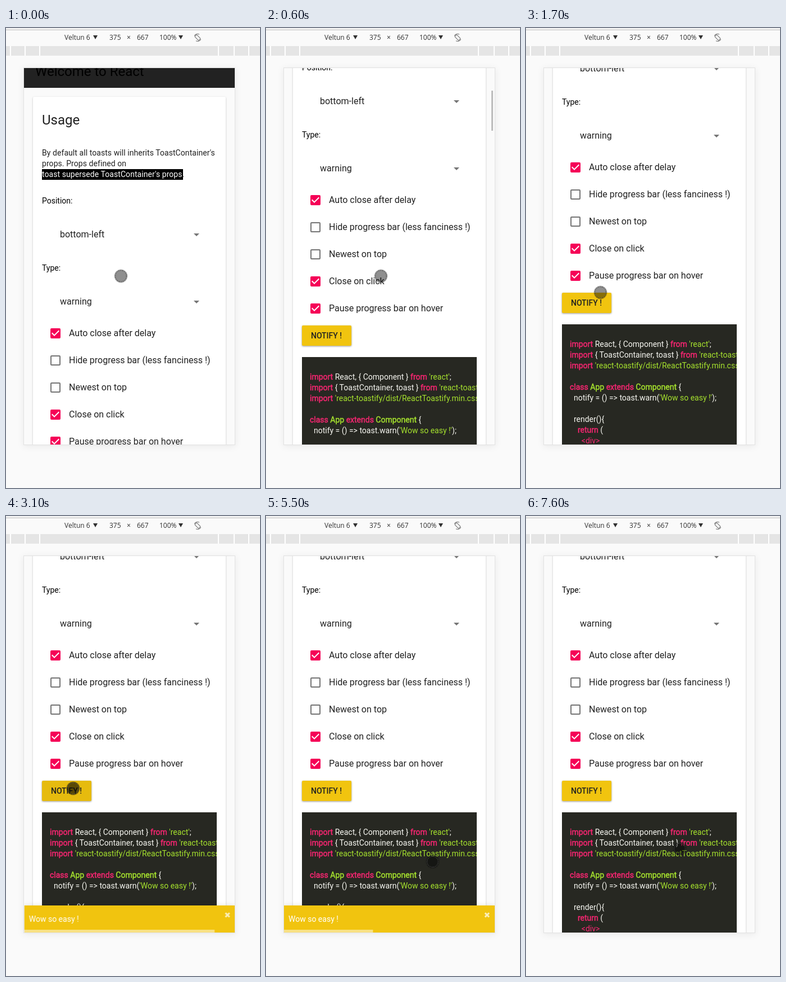
Recreate the animation shown at these times as an HTML page. Size 452 px wide and 815 px high, loop 8000 ms.

```html
<!DOCTYPE html>
<html lang="en">
<head>
<meta charset="utf-8">
<title>Toast demo</title>
<style>
html, body { margin: 0; width: 100%; height: 100%; overflow: hidden; background: #fafafa; }
svg { display: block; font-family: Roboto, sans-serif; }
text { white-space: pre; }
.toolbar { font: 12px "Open Sans", "Noto Sans", sans-serif; fill: #303030; }
.body { font-size: 14px; fill: #212121; letter-spacing: .065px; }
.label { font-size: 14px; }
.item { font-size: 16px; fill: #212121; }
.card { fill: #fff; filter: drop-shadow(0 1px 1.5px rgba(0,0,0,.24)); }
.button { fill: #f1c40f; filter: drop-shadow(0 1px 1.5px rgba(0,0,0,.4)); }
.code { font-size: 14px; fill: #f8f8f2; }
.key { fill: #f92672; stroke: #f92672; stroke-width: .45px; }
.name { fill: #a6e22e; stroke: #a6e22e; stroke-width: .45px; }
.str { fill: #a6e22e; }
.tag { fill: #f92672; }

.page, .thumb, .ripple, .toast, .progress, .cursor, .press {
  animation: 8s linear infinite paused;
}
.page { animation-name: scroll; }
.thumb { animation-name: thumb; }
.ripple { animation-name: ripple; }
.toast { animation-name: toast; }
.progress { animation-name: progress; }
.cursor { animation-name: cursor; }
.press { animation-name: press; }

@keyframes scroll {
  0%, 3.75% { transform: translateY(0); }
  7.5% { transform: translateY(-236px); animation-timing-function: ease-out; }
  10%, 100% { transform: translateY(-294px); }
}
@keyframes thumb {
  0%, 3.75% { transform: translateY(87px); opacity: 0; }
  5% { opacity: 1; }
  7.5% { transform: translateY(111px); animation-timing-function: ease-out; }
  10% { transform: translateY(117px); }
  16.25% { opacity: 1; }
  20%, 100% { transform: translateY(117px); opacity: 0; }
}
@keyframes ripple {
  0%, 31.24% { opacity: 0; }
  31.25% { opacity: .12; }
  38.75% { opacity: .04; }
  41.25%, 100% { opacity: 0; }
}
@keyframes toast {
  0% { transform: translateX(-3000px); opacity: 0; }
  32.69% { transform: translateX(-3000px); opacity: 0; animation-timing-function: cubic-bezier(.215,.61,.355,1); }
  38.31% { transform: translateX(25px); opacity: 1; animation-timing-function: cubic-bezier(.215,.61,.355,1); }
  39.72% { transform: translateX(-10px); animation-timing-function: cubic-bezier(.215,.61,.355,1); }
  41.13% { transform: translateX(5px); animation-timing-function: cubic-bezier(.215,.61,.355,1); }
  42.06% { transform: translateX(0); }
  86.63% { transform: translateX(0); animation-timing-function: ease; }
  88.5% { transform: translateX(20px); opacity: 1; animation-timing-function: ease; }
  96%, 100% { transform: translateX(-2000px); opacity: 0; }
}
@keyframes progress {
  0%, 32.69% { transform: scaleX(1); }
  85.88%, 100% { transform: scaleX(.149); }
}
@keyframes cursor {
  0%, 16.25% { transform: translate(204.5px, 439.5px); }
  21.25% { transform: translate(132.5px, 468.5px); }
  23.75%, 26.25% { transform: translate(117.5px, 482.5px); }
  27.5%, 41.25% { transform: translate(119.5px, 482.5px); animation-timing-function: ease-in-out; }
  52.5% { transform: translate(436px, 519px); animation-timing-function: ease-in; }
  63.75% { transform: translate(389px, 527px); }
  68.75% { transform: translate(296.5px, 612.5px); }
  75% { transform: translate(255px, 681px); animation-timing-function: ease-out; }
  82.5%, 87.5% { transform: translate(230.5px, 712.5px); animation-timing-function: ease-in-out; }
  95%, 100% { transform: translate(273.5px, 589.5px); }
}
@keyframes press {
  0%, 31.24% { opacity: 0; }
  31.25%, 41.25% { opacity: .3; }
  41.26%, 86.24% { opacity: 0; }
  86.25%, 88.74% { opacity: .3; }
  88.75%, 100% { opacity: 0; }
}
</style>
</head>
<body>
<svg width="452" height="815" viewBox="0 0 452 815">
  <defs>
    <clipPath id="screen"><rect x="32" y="71" width="375" height="667"/></clipPath>
    <clipPath id="codeBox"><rect x="64" y="819" width="311" height="400"/></clipPath>
    <g id="on">
      <rect x="3" y="3" width="18" height="18" rx="2" fill="#f50057"/>
      <path d="M5.7 11.3 10 15.6 18.3 7.3" fill="none" stroke="#fff" stroke-width="2"/>
    </g>
    <rect id="off" x="4" y="4" width="16" height="16" rx="1" fill="none" stroke="#757575" stroke-width="2"/>
    <path id="drop" d="M0 0h10l-5 5z" fill="#757575"/>
    <path id="caret" d="M0 0h8l-4 7z" fill="#303030"/>
  </defs>

  <rect width="452" height="815" fill="#fafafa"/>
  <rect width="452" height="3" fill="#f2f2f2"/>
  <rect y="3" width="452" height="1" fill="#c4c4c4"/>
  <rect y="4" width="452" height="28" fill="#fafafa"/>
  <rect y="32" width="452" height="17" fill="#e5e5e5"/>
  <path d="M8 32v17M34 32v17M60 32v17M378 32v17M406 32v17M432 32v17" stroke="#fff" stroke-width="2"/>
  <g class="toolbar">
    <text x="104" y="21">Veltun 6</text>
    <use href="#caret" x="155" y="13"/>
    <text x="184" y="21">375</text>
    <text x="215" y="21">×</text>
    <text x="233" y="21">667</text>
    <text x="273" y="21">100%</text>
    <use href="#caret" x="307" y="13"/>
  </g>
  <g transform="translate(341 17) rotate(-45)" fill="none" stroke="#6e6e6e">
    <rect x="-2.5" y="-5" width="5" height="10" rx="1"/>
    <path d="M-2-6.2A6.5 6.5 0 0 1 6.2-2M2 6.2A6.5 6.5 0 0 1-6.2 2"/>
  </g>

  <rect x="31.5" y="70.5" width="376" height="668" fill="#fafafa" stroke="#e2e2e2" style="filter:drop-shadow(0 2px 6px rgba(0,0,0,.07))"/>

  <g clip-path="url(#screen)">
    <g class="page">
      <rect x="32" y="0" width="375" height="106" fill="#222"/>
      <text x="52" y="85" font-size="24">Welcome to React</text>
      <rect class="card" x="48" y="122" width="343" height="1300" rx="2"/>
      <text x="64" y="171" font-size="24" fill="#212121">Usage</text>

      <rect x="64" y="250" width="251" height="19"/>
      <g class="body">
        <text x="64" y="226">By default all toasts will inherits ToastContainer's</text>
        <text x="64" y="245">props. Props defined on</text>
        <text x="64" y="264"><tspan fill="#fff">toast supersede ToastContainer's props</tspan>.</text>
      </g>

      <text class="label" x="64" y="311">Position:</text>
      <text class="item" x="96" y="371">bottom-left</text>
      <use href="#drop" x="334" y="364"/>
      <text class="label" x="64" y="430">Type:</text>
      <text class="item" x="96" y="490">warning</text>
      <use href="#drop" x="334" y="483"/>

      <use href="#on" x="76" y="529"/>
      <text class="item" x="112" y="546">Auto close after delay</text>
      <use href="#off" x="76" y="577"/>
      <text class="item" x="112" y="594">Hide progress bar (less fanciness !)</text>
      <use href="#off" x="76" y="625"/>
      <text class="item" x="112" y="642">Newest on top</text>
      <use href="#on" x="76" y="673"/>
      <text class="item" x="112" y="690">Close on click</text>
      <use href="#on" x="76" y="721"/>
      <text class="item" x="112" y="738">Pause progress bar on hover</text>

      <rect class="button" x="64" y="763" width="88" height="36" rx="2"/>
      <rect class="ripple" x="64" y="763" width="88" height="36" rx="2"/>
      <text x="80" y="786" font-size="14" font-weight="500" fill="#212121">NOTIFY !</text>

      <rect x="64" y="819" width="311" height="400" fill="#272822"/>
      <g class="code" clip-path="url(#codeBox)">
        <text x="78" y="859"><tspan class="key">import</tspan> React, { Component } <tspan class="key">from</tspan> <tspan class="str">'react'</tspan>;</text>
        <text x="78" y="878"><tspan class="key">import</tspan> { ToastContainer, toast } <tspan class="key">from</tspan> <tspan class="str">'react-toastify'</tspan>;</text>
        <text x="78" y="897"><tspan class="key">import</tspan> <tspan class="str">'react-toastify/dist/ReactToastify.min.css'</tspan>;</text>
        <text x="78" y="935"><tspan class="key">class</tspan> <tspan class="name">App</tspan> <tspan class="key">extends</tspan> <tspan class="name">Component</tspan> {</text>
        <text x="78" y="954">  notify = () =&gt; toast.warn(<tspan class="str">'Wow so easy !'</tspan>);</text>
        <text x="78" y="992">  render(){</text>
        <text x="78" y="1011">    <tspan class="key">return</tspan> (</text>
        <text x="78" y="1030">      <tspan class="tag">&lt;div&gt;</tspan></text>
      </g>
    </g>

    <rect class="thumb" x="401" width="3" height="71" fill="#bdbdbd"/>

    <g class="toast">
      <rect x="32" y="690" width="375" height="48" fill="#f1c40f" style="filter:drop-shadow(0 1px 5px rgba(0,0,0,.12))"/>
      <text x="40" y="719" font-size="14" fill="#fff">Wow so easy !</text>
      <text x="387.5" y="712" font-size="14" fill="#fff" opacity=".7" font-family="DejaVu Sans, sans-serif">✖</text>
      <g transform="translate(32 733)">
        <rect class="progress" width="375" height="5" fill="#fff" opacity=".49"/>
      </g>
    </g>
  </g>

  <g class="cursor">
    <circle r="11.5" fill="#000" opacity=".44"/>
    <circle class="press" r="11.5"/>
    <circle r="10" fill="none" stroke="#fff" opacity=".3"/>
    <circle r="10" fill="none" stroke="#000" stroke-dasharray="2 1.5" opacity=".85"/>
  </g>
</svg>
<script>
const LOOP = 8000, STEP = 100;
const animations = document.getAnimations();
const start = performance.now();

function draw() {
  const elapsed = (performance.now() - start) % LOOP;
  const time = Math.floor(elapsed / STEP) * STEP;
  for (const animation of animations) animation.currentTime = time;
  requestAnimationFrame(draw);
}
draw();
</script>
</body>
</html>
```
